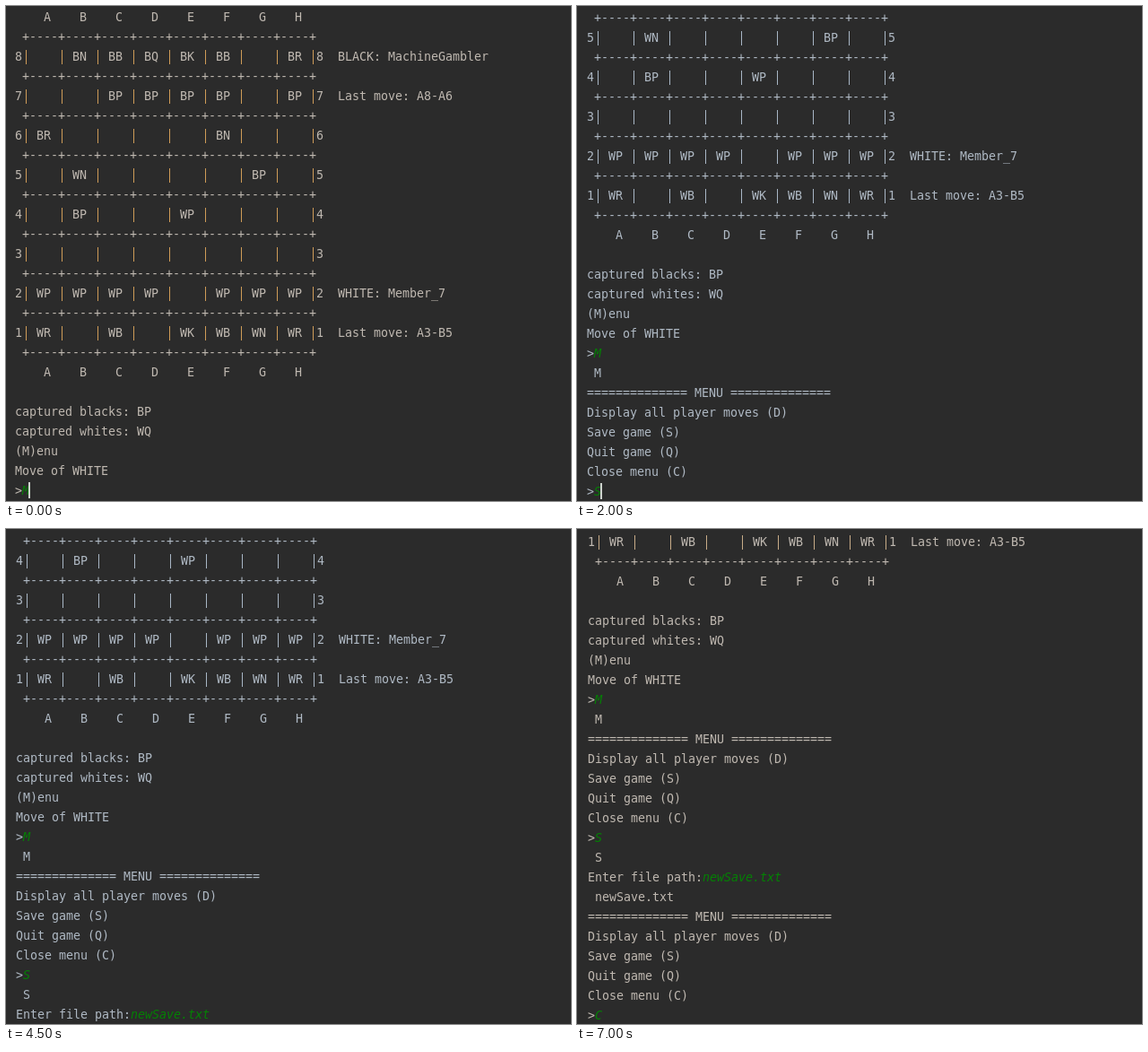
Recreate the animation shown at these times as an HTML page with a canvas. Size 630x552 px, loop 8 s.

```html
<!DOCTYPE html>
<html lang="en">
<head>
<meta charset="utf-8">
<title>Console chess</title>
<style>
html, body { margin: 0; height: 100%; overflow: hidden; background: #2b2b2b; }
canvas { display: block; }
</style>
</head>
<body>
<canvas width="630" height="552"></canvas>
<script>
const ctx = document.querySelector('canvas').getContext('2d');
const CELL = 8, LINE = 22, ROWS = 25, LOOP = 8000;
const FONT = '13.333px "DejaVu Sans Mono", "Noto Sans Mono", monospace';

const board = [
  '-- BN BB BQ BK BB -- BR',
  '-- -- BP BP BP BP -- BP',
  'BR -- -- -- -- BN -- --',
  '-- WN -- -- -- -- BP --',
  '-- BP -- -- WP -- -- --',
  '-- -- -- -- -- -- -- --',
  'WP WP WP WP -- WP WP WP',
  'WR -- WB -- WK WB WN WR',
];
const notes = {
  8: 'BLACK: MachineGambler', 7: 'Last move: A8-A6',
  2: 'WHITE: Member_7', 1: 'Last move: A3-B5',
};
const files = '    ' + [...'ABCDEFGH'].join('    ');
const border = ' +' + '----+'.repeat(8);
const rule = '='.repeat(14);
const menu = [
  `${rule} MENU ${rule}`, 'Display all player moves (D)',
  'Save game (S)', 'Quit game (Q)', 'Close menu (C)',
];
const boardLines = board.flatMap((row, i) => {
  const rank = 8 - i;
  const cells = row.split(' ').map(p => ` ${p === '--' ? '  ' : p} |`).join('');
  return [`${rank}|${cells}${rank}  ${notes[rank] || ''}`, border];
});

// A tab separates printed text from what the user types.
const log = [
  files, border, ...boardLines, files, '',
  'captured blacks: BP', 'captured whites: WQ', '(M)enu', 'Move of WHITE',
  '>\tM', ' M', ...menu,
  '>\tS', ' S', 'Enter file path:\tnewSave.txt', ' newSave.txt', ...menu,
  '>\tC',
];

const views = [
  { at: 0, top: 0, x: 10, y: 17, ink: '#bfb8b0', bar: '#cf9c58', caret: 25 },
  { at: 500, top: 7, x: 11, y: 18, ink: '#afb9c4', bar: '#a9b7c6', caret: 26 },
  { at: 3000, top: 9, x: 11, y: 18, ink: '#afb9c4', bar: '#a9b7c6' },
  { at: 5500, top: 16, x: 12, y: 19, ink: '#bfb8b0', bar: '#c8ac88' },
];

// Bars are solid strokes, taller than the letters.
function drawText(text, x, y, color, barColor = color) {
  [...text].forEach((ch, i) => {
    const left = x + i * CELL;
    ctx.fillStyle = ch === '|' ? barColor : color;
    if (ch === '|') ctx.fillRect(left + CELL / 2, y - 12, 1, 16);
    else ctx.fillText(ch, left, y);
  });
}

function draw(view) {
  ctx.fillStyle = '#2b2b2b';
  ctx.fillRect(0, 0, 630, 552);
  log.slice(view.top, view.top + ROWS).forEach((line, i) => {
    const [printed, typed = ''] = line.split('\t');
    const y = view.y + i * LINE;
    ctx.font = FONT;
    drawText(printed, view.x, y, view.ink, view.bar);
    ctx.font = 'italic ' + FONT;
    drawText(typed, view.x + printed.length * CELL, y, '#048004');
  });
  if (view.caret) {
    ctx.fillStyle = '#cdd3cd';
    ctx.fillRect(view.caret, view.y + 514, 2, 18);
  }
}

function tick() {
  const t = performance.now() % LOOP;
  draw(views.findLast(v => t >= v.at));
  requestAnimationFrame(tick);
}
tick();
</script>
</body>
</html>
```
